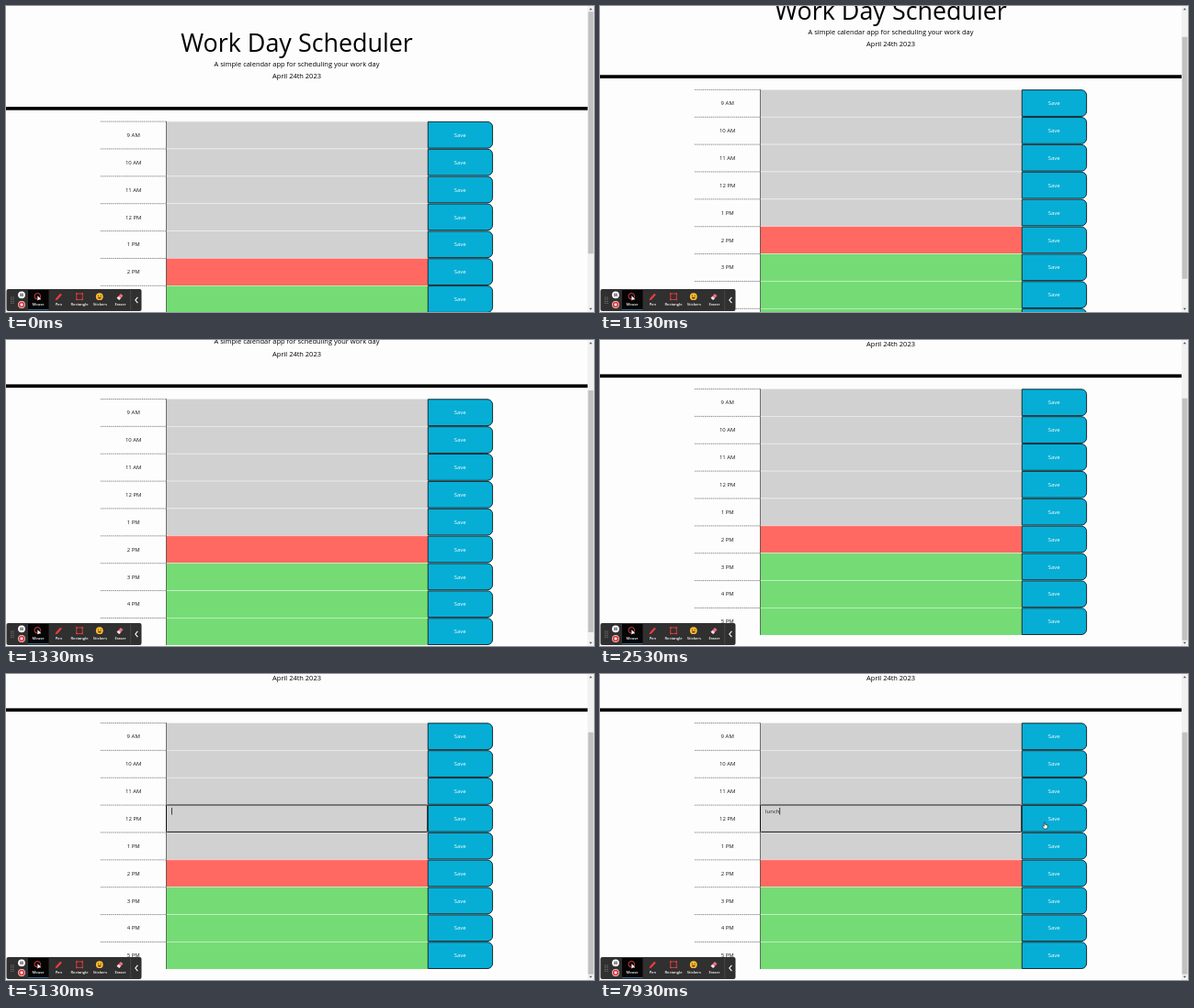
Write an HTML page with a canvas that moves like this. It is 640 by 334 pixels and loops after 8000 ms.

```html
<!DOCTYPE html>
<html lang="en">
<head>
<meta charset="utf-8">
<title>Work Day Scheduler</title>
<style>
  html, body { margin: 0; width: 100%; height: 100%; overflow: hidden; background: #fdfdfd; }
  canvas { display: block; }
</style>
</head>
<body>
<canvas id="stage" width="640" height="334"></canvas>
<script>
const ctx = document.getElementById('stage').getContext('2d');
const LOOP = 8000, STEP = 200 / 3;
const PAGE_WIDTH = 633, CENTER = 316.5, MAX_SCROLL = 72.6;
const ROW_TOP = 125.8, ROW_HEIGHT = 29.87;
const HOUR_X = 103, FIELD_X = 174.4, SAVE_X = 459, END_X = 529.6;
const HOURS = ['9 AM', '10 AM', '11 AM', '12 PM', '1 PM', '2 PM', '3 PM', '4 PM', '5 PM'];
const NOW_ROW = 5, EDIT_ROW = 3;
const CLICK_AT = 4055, KEY_TIMES = [5795, 6055, 6325, 6455, 6590];
const MOVE_START = 6760, MOVE_END = 7880;

const clamp = v => Math.max(0, Math.min(1, v));

function rect(x, y, w, h, color) {
  ctx.fillStyle = color;
  ctx.fillRect(x, y, w, h);
}

function line(points, color, width = 1) {
  ctx.beginPath();
  points.forEach(([x, y]) => ctx.lineTo(x, y));
  ctx.strokeStyle = color;
  ctx.lineWidth = width;
  ctx.stroke();
}

function polygon(points, fill) {
  ctx.beginPath();
  points.forEach(([x, y]) => ctx.lineTo(x, y));
  ctx.closePath();
  ctx.fillStyle = fill;
  ctx.fill();
}

function disc(x, y, r, fill) {
  ctx.beginPath();
  ctx.arc(x, y, r, 0, 7);
  ctx.fillStyle = fill;
  ctx.fill();
}

function ring(x, y, r, color, width) {
  ctx.beginPath();
  ctx.arc(x, y, r, 0, 7);
  ctx.strokeStyle = color;
  ctx.lineWidth = width;
  ctx.stroke();
}

function text(str, x, y, size, color = '#151719', align = 'center', weight = 400) {
  ctx.font = `${weight} ${size}px "Open Sans", sans-serif`;
  ctx.textAlign = align;
  ctx.fillStyle = color;
  ctx.fillText(str, x, y);
}

function drawHeader() {
  text('Work Day Scheduler', CENTER, 50.2, 26.88, '#000');
  text('A simple calendar app for scheduling your work day', CENTER, 65.6, 7.47, '#000');
  text('April 24th 2023', CENTER, 79.2, 7.47, '#000');
  rect(0, 110, PAGE_WIDTH, 3.7, '#000');
}

function drawRow(hour, i) {
  const y = ROW_TOP + i * ROW_HEIGHT;
  const color = i < NOW_ROW ? '#d1d1d1' : i === NOW_ROW ? '#ff6961' : '#75dc75';
  ctx.setLineDash([1.1, 0.7]);
  line([[HOUR_X, y + 0.3], [FIELD_X, y + 0.3]], '#333', 0.6);
  ctx.setLineDash([]);
  text(hour, 138.7, y + 17.2, 6);

  rect(FIELD_X, y, SAVE_X - FIELD_X, ROW_HEIGHT, color);
  rect(FIELD_X, y, SAVE_X - FIELD_X, 0.6, 'rgba(255,255,255,.75)');
  rect(FIELD_X - 0.2, y, 0.6, ROW_HEIGHT, '#222');

  ctx.beginPath();
  ctx.roundRect(SAVE_X + 0.3, y + 0.6, END_X - SAVE_X - 0.3, ROW_HEIGHT - 1.1, [0, 5.6, 5.6, 0]);
  ctx.fillStyle = '#06aed5';
  ctx.fill();
  ctx.strokeStyle = '#0a1a20';
  ctx.lineWidth = 0.9;
  ctx.stroke();
  text('Save', 494.2, y + 17.2, 6, '#fff');
}

function drawEditing(t) {
  if (t < CLICK_AT) return;
  const y = ROW_TOP + EDIT_ROW * ROW_HEIGHT;
  const typed = KEY_TIMES.filter(k => t >= k);
  const word = 'lunch'.slice(0, typed.length);
  const lastInput = typed.length ? typed[typed.length - 1] : CLICK_AT;

  ctx.beginPath();
  ctx.roundRect(FIELD_X + 0.1, y + 0.2, SAVE_X - FIELD_X - 0.3, ROW_HEIGHT - 0.5, 0.8);
  ctx.strokeStyle = '#111';
  ctx.lineWidth = 1;
  ctx.stroke();

  text(word, 180, y + 9.1, 6, '#222', 'left');
  const caretX = 180 + ctx.measureText(word).width;
  if ((t - lastInput) % 1000 < 500) rect(caretX, y + 3.1, 0.7, 7.6, '#000');
}

function drawScrollbar(scroll) {
  const pageHeight = 334 + MAX_SCROLL, track = 321.4;
  rect(PAGE_WIDTH, 0, 7, 334, '#f1f1f1');
  rect(PAGE_WIDTH + 0.6, 6.3 + scroll * track / pageHeight, 5.8, track * 334 / pageHeight, '#c1c1c1');
  polygon([[634.8, 4.2], [638, 4.2], [636.4, 2.3]], '#505050');
  polygon([[634.8, 329.8], [638, 329.8], [636.4, 331.7]], '#505050');
}

function drawToolbar() {
  ctx.beginPath();
  ctx.roundRect(0.5, 309, 147, 24, 2);
  ctx.fillStyle = '#303030';
  ctx.fill();
  for (let i = 0; i < 8; i++) disc(5.8 + (i % 2) * 2.2, 318 + (i >> 1) * 2.1, 0.5, '#aaa');

  disc(17, 315.3, 3.9, '#fff');
  rect(15.5, 313.6, 1, 3.4, '#222');
  rect(17.5, 313.6, 1, 3.4, '#222');
  disc(17, 326, 3.9, '#f3d4d4');
  disc(17, 326, 3.2, '#e0393e');
  rect(15.7, 324.7, 2.6, 2.6, '#fff');

  rect(24, 310, 22.5, 22, '#050505');
  rect(24, 331, 22.5, 1, '#33678a');
  ring(34.3, 316.8, 3.3, '#ef4444', 0.9);
  polygon([[34.4, 316.2], [34.4, 321.6], [35.8, 320.4], [38.3, 320.2]], '#fff');

  line([[55, 320], [60, 314.6]], '#ef3d3d', 2.2);
  polygon([[53.6, 321.2], [54.3, 318.9], [56, 320.5]], '#ef3d3d');

  ctx.strokeStyle = '#e53b3b';
  ctx.lineWidth = 0.9;
  ctx.strokeRect(76.8, 314, 6.4, 6.4);
  for (const x of [76.8, 83.2]) for (const y of [314, 320.4]) rect(x - 0.8, y - 0.8, 1.6, 1.6, '#e53b3b');

  disc(101.8, 317.2, 3.9, '#fbc02d');
  disc(100.4, 316.2, 0.6, '#5b3a10');
  disc(103.2, 316.2, 0.6, '#5b3a10');
  ctx.beginPath();
  ctx.arc(101.8, 317.7, 2, 0, Math.PI);
  ctx.fillStyle = '#7d3520';
  ctx.fill();

  polygon([[120.6, 318.8], [124.9, 314], [127.5, 316.2], [123.2, 321]], '#f06c85');
  polygon([[120.6, 318.8], [122.3, 316.9], [124.9, 319.1], [123.2, 321]], '#f7e5e8');

  const labels = [['Mouse', 35], ['Pen', 57.3], ['Rectangle', 80], ['Stickers', 102.3], ['Eraser', 124.5]];
  for (const [label, x] of labels) text(label, x, 327, 4, '#fff', 'center', 600);
  rect(135.5, 310, 0.6, 22, '#555');
  line([[143.4, 317.8], [140.8, 321], [143.4, 324.2]], '#fff', 1.1);
}

function drawPointer(t) {
  if (t >= CLICK_AT && t < 4250) ring(244.4, 163.2, 11.9, '#d8423f', 1.1);
  if (t < MOVE_START) return;
  const u = clamp((t - MOVE_START) / (MOVE_END - MOVE_START));
  const ease = u * u * (3 - 2 * u);
  const x = 244 + 240 * ease, y = 163 - ease;
  if (x < SAVE_X) {
    line([[x, y - 3], [x, y + 3]], '#222', 0.7);
    line([[x - 1.2, y - 3.2], [x + 1.2, y - 3.2]], '#222', 0.6);
    line([[x - 1.2, y + 3.2], [x + 1.2, y + 3.2]], '#222', 0.6);
    return;
  }
  const hand = [[-0.7, 0], [0.6, 0], [0.7, 2.4], [3.2, 3], [3.3, 5], [2.4, 7], [-0.6, 7], [-2.6, 4.3], [-1.9, 3.6], [-0.7, 4.4], [-0.7, 0]]
    .map(([dx, dy]) => [x + dx, y + dy]);
  polygon(hand, '#fff');
  line(hand, '#111', 0.6);
}

function render(t) {
  const scroll = MAX_SCROLL * (1 - (1 - clamp((t - 990) / 735)) ** 3);
  rect(0, 0, 640, 334, '#fdfdfd');
  ctx.save();
  ctx.translate(0, -scroll);
  drawHeader();
  HOURS.forEach(drawRow);
  drawEditing(t);
  ctx.restore();
  drawScrollbar(scroll);
  drawToolbar();
  drawPointer(t);
}

const start = performance.now();
function tick() {
  const t = (performance.now() - start) % LOOP;
  render(Math.floor((t + 7) / STEP) * STEP);
  requestAnimationFrame(tick);
}
tick();
</script>
</body>
</html>
```
